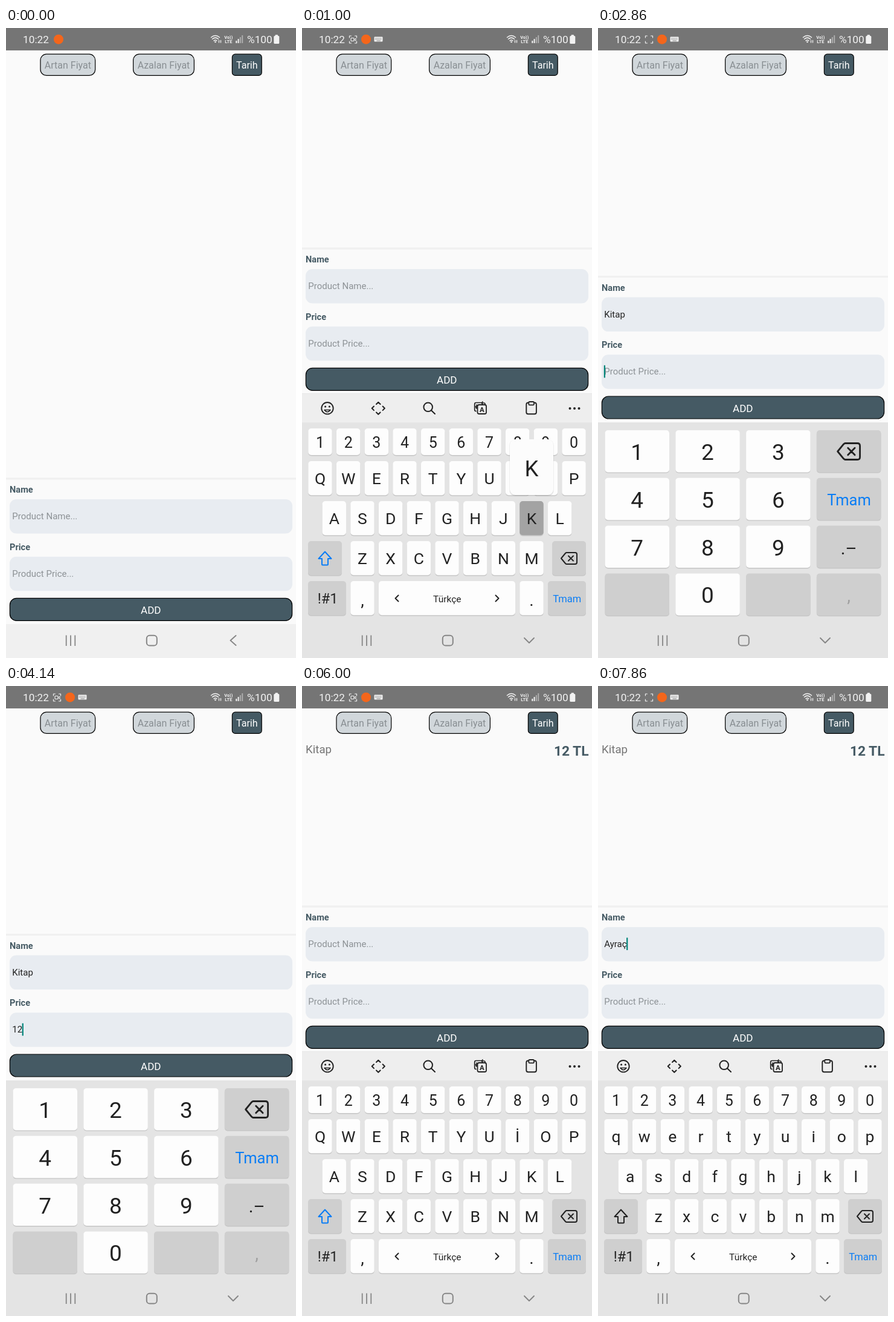
Write an HTML page that moves like this. It is 480 by 1040 pixels and loops after 8 s.

```html
<!DOCTYPE html>
<html lang="tr">
<head>
<meta charset="utf-8">
<title>Product list</title>
<style>
  html, body { margin: 0; width: 100%; height: 100%; overflow: hidden; background: #fafafa; }
  svg { display: block; width: 480px; height: 1040px; font-family: Roboto, sans-serif; }
</style>
</head>
<body>
<svg id="stage" viewBox="0 0 480 1040"></svg>
<script>
const LOOP = 8000, TICKS_PER_SECOND = 7;
const SLATE = '#455a64', INK = '#222', BLUE = '#0a7df5', KEY = '#fdfdfd', DARK_KEY = '#cfcfcf', HELD = '#a3a3a3';
const stage = document.getElementById('stage');

// Each step lists what changes at that tick.
const steps = [
  [0, { name: '', price: '', form: 0, pad: '', caps: true, slide: 0, focus: '', held: '', menu: false, icons: 0, item: false, addOpacity: 1 }],
  [1, { icons: 1 }],
  [2, { focus: 'name' }],
  [3, { pad: 'letters', form: -380, slide: 210 }],
  [4, { slide: 45 }],
  [5, { slide: 0, icons: 2 }],
  [6, { focus: '' }],
  [7, { held: 'k' }],
  [8, { name: 'K', held: '', caps: false, focus: 'name' }],
  [9, { held: 'i' }],
  [10, { held: '', name: 'Ki' }],
  [11, { held: 't' }],
  [12, { held: '', name: 'Kit' }],
  [13, { held: 'a' }],
  [14, { held: '', name: 'Kita' }],
  [15, { name: 'Kitap' }],
  [18, { focus: 'price' }],
  [19, { pad: 'digits', form: -333.4 }],
  [23, { held: '1' }],
  [24, { held: '', price: '1' }],
  [25, { held: '2' }],
  [26, { held: '', price: '12' }],
  [30, { addOpacity: 0.4 }],
  [31, { name: '', price: '', item: true, addOpacity: 0.7 }],
  [32, { addOpacity: 1 }],
  [36, { focus: '' }],
  [38, { focus: 'name' }],
  [39, { pad: 'letters', form: -380, caps: true }],
  [42, { focus: '' }],
  [43, { held: 'a' }],
  [45, { held: '', name: 'A', caps: false, focus: 'name' }],
  [46, { held: 'y' }],
  [47, { held: '', name: 'Ay' }],
  [48, { held: 'r' }],
  [49, { held: '', name: 'Ayr' }],
  [50, { held: 'a' }],
  [51, { held: '', name: 'Ayra' }],
  [52, { held: 'c' }],
  [53, { menu: true }],
  [55, { held: '', menu: false, name: 'Ayraç' }]
];

const stateAt = tick => Object.assign({}, ...steps.filter(s => s[0] <= tick).map(s => s[1]));

const rect = (x, y, w, h, r, fill, extra = '') =>
  `<rect x="${x}" y="${y}" width="${w}" height="${h}" rx="${r}" fill="${fill}" ${extra}/>`;
const text = (x, y, size, fill, str, anchor = 'start', weight = 400, extra = '') =>
  `<text x="${x}" y="${y}" font-size="${size}" fill="${fill}" text-anchor="${anchor}" font-weight="${weight}" ${extra}>${str}</text>`;
const mid = (x, y, size, fill, str, weight) => text(x, y, size, fill, str, 'middle', weight);
const line = (d, color = INK, width = 2, extra = '') =>
  `<path d="${d}" fill="none" stroke="${color}" stroke-width="${width}" stroke-linecap="round" stroke-linejoin="round" ${extra}/>`;
const circle = (x, y, r, fill, extra = '') => `<circle cx="${x}" cy="${y}" r="${r}" fill="${fill}" ${extra}/>`;
const outline = (color, width) => `stroke="${color}" stroke-width="${width}"`;

function statusBar(s, recording) {
  const white = '#f2f2f2';
  let out = rect(0, 0, 480, 37, 0, '#757575') + text(28, 25, 17.3, white, '10:22');
  out += circle(s.icons ? 106 : 87, 18.7, 8, '#f4661b');
  if (s.icons) {
    out += line('M81.500 13H78.500V16M87.500 13H90.500V16M78.500 22V25H81.500M90.500 22V25H87.500', white, 1.2);
    if (recording) out += rect(81, 16.5, 5, 5, 1, 'none', outline(white, 1.1)) + line('M86.500 19L89 17V21Z', white, 1);
  }
  if (s.icons > 1) {
    out += rect(119.5, 14.5, 14, 8, 1, white);
    out += line('M121.500 17H132M121.500 19H132', '#757575', 0.9, 'stroke-dasharray="0.6 1.6"') + line('M124 21H129.500', '#757575', 0.8);
  }
  out += line('M339.500 15.500Q346.500 9.500 353.500 15.500M341.500 18.300Q346.500 14 351.500 18.300M344 21Q346.500 19 349 21', white, 1.5);
  out += circle(346.5, 23, 1.3, white) + line('M352.500 24V20.500M355.500 20.500V24', white, 1.3);
  out += mid(368.3, 17.5, 7.4, white, 'Vo))', 700) + mid(368.3, 25, 7.4, white, 'LTE', 700);
  for (let i = 0; i < 4; i++) {
    const h = 4 + i * 3;
    out += rect(380.3 + i * 3.3, 25 - h, 2, h, 0.5, white, i > 1 ? 'opacity="0.45"' : '');
  }
  return out + text(399, 25, 17.3, white, '%100') + rect(443.3, 13, 9, 13, 1.5, white) + rect(445.5, 11.3, 4.6, 3, 0.8, white);
}

function sortButtons() {
  const black = outline('#000', 1.2);
  return rect(57, 43.2, 90.7, 35.2, 10, '#d1d7db', black) + mid(102.4, 67, 16, '#888e92', 'Artan Fiyat') +
    rect(210.6, 43.2, 100.8, 35.2, 10, '#d1d7db', black) + mid(261, 67, 16, '#888e92', 'Azalan Fiyat') +
    rect(374.4, 43.2, 48.8, 35.2, 5, SLATE, black) + mid(398.8, 67, 16, '#fff', 'Tarih');
}

function field(id, label, y, value, hint) {
  return text(6, y - 11, 14.6, SLATE, label, 'start', 700) + rect(6, y, 468, 56.5, 11, '#e8ecf1') +
    text(10.3, y + 33, 15, value ? INK : '#8d9296', value || hint, 'start', 400, `id="${id}"`);
}

function form(s) {
  return `<g transform="translate(0 ${s.form})">` + rect(0, 742.5, 480, 3, 0, '#f0f0f0') +
    field('name', 'Name', 778, s.name, 'Product Name...') +
    field('price', 'Price', 872.7, s.price, 'Product Price...') +
    `<g opacity="${s.addOpacity}">` + rect(6.4, 941.4, 467.2, 37, 11, SLATE, outline('#000', 1.2)) +
    mid(239.8, 967, 17.1, '#fff', 'ADD') + '</g></g>';
}

function caret(s) {
  if (!s.focus) return '';
  const width = s[s.focus] ? document.getElementById(s.focus).getComputedTextLength() : 0;
  const top = (s.focus === 'name' ? 795.5 : 890.2) + s.form;
  return rect(9.8 + width, top, 2.2, 20.5, 0, '#00857a');
}

const keycap = (x, y, w, h, fill) => rect(x, y + 1.4, w, h, 5, '#c6c6c6') + rect(x, y, w, h, 5, fill);

function backspace(x, y, k) {
  return `<g transform="translate(${x} ${y}) scale(${k})">` +
    line('M-13 0L-6 -8.500Q-5 -9.500 -4 -9.500H10Q13 -9.500 13 -6.500V6.500Q13 9.500 10 9.500H-4Q-5 9.500 -6 8.500ZM-1 -4L7 4M7 -4L-1 4') + '</g>';
}

function toolbar() {
  return rect(0, 603.7, 480, 47.5, 0, '#eee') +
    circle(42, 627.7, 9.7, 'none', outline(INK, 1.9)) + circle(38.6, 625, 1.5, INK) + circle(45.4, 625, 1.5, INK) +
    line('M37 630.500Q42 637 47 630.500Z', INK, 1.6) +
    line('M123 621L126.300 617.700L129.600 621M123 634.500L126.300 637.800L129.600 634.500M119 624.500L115.700 627.800L119 631.100M133.600 624.500L136.900 627.800L133.600 631.100') +
    circle(208.7, 625.8, 7.3, 'none', outline(INK, 2)) + line('M214 631.200L220 637') +
    rect(290.5, 622, 14.5, 15, 2.5, 'none', outline(INK, 1.8)) +
    line('M288 632.500Q285.700 632.500 285.700 630V621Q285.700 618.500 288 618.500H296M289 622V628M287.500 625L289 628M299 617L297 619L299 621M297 619H301Q303 619 303 621', INK, 1.7) +
    mid(297.8, 634, 11.5, INK, 'A', 700) +
    rect(371.3, 618.5, 16.6, 18.8, 3, 'none', outline(INK, 1.9)) + rect(375.3, 617, 8.6, 5.4, 1.5, '#eee', outline(INK, 1.8)) +
    [443.5, 451, 458.5].map(x => circle(x, 628, 2, INK)).join('');
}

function letterPad(s) {
  const rows = [['1234567890', 30, 661, 44], ['qwertyuiop', 30, 715, 56.3], ['asdfghjkl', 53.3, 781, 56.3], ['zxcvbnm', 100, 847, 56.3]];
  const cased = ch => s.caps ? ch.toLocaleUpperCase('tr') : ch;
  let out = rect(0, 603, 480, 437, 0, '#e4e4e4') + toolbar(), popup = '';
  for (const [chars, start, y, h] of rows) {
    [...chars].forEach((ch, i) => {
      const x = start + i * 46.67, held = ch === s.held;
      out += keycap(x - 19.7, y, 39.4, h, held ? HELD : KEY);
      out += mid(x, y + (h < 50 ? 32.2 : 38), h < 50 ? 25 : 26.5, INK, cased(ch));
      if (held) popup = bubble(x, y - 102, s.menu ? ['ç', 'ć'] : [cased(ch)]);
    });
  }
  const shiftColor = s.caps ? BLUE : INK;
  out += keycap(10, 847, 56, 56.3, DARK_KEY) + line('M38 864.500L48.500 876H43V885.500Q43 886.500 42 886.500H34Q33 886.500 33 885.500V876H27.500Z', shiftColor, 2);
  out += keycap(414, 847, 56, 56.3, DARK_KEY) + backspace(442, 875.5, 1);
  out += keycap(10, 913, 63, 56.3, DARK_KEY) + mid(42.5, 950, 23.5, INK, '!#1');
  out += keycap(80.3, 913, 39.4, 56.3, KEY) + mid(100, 954, 28, INK, ',');
  out += keycap(127, 913, 226, 56.3, KEY) + mid(240.3, 948, 15.5, INK, 'Türkçe');
  out += line('M159.500 936.500L154.500 941.500L159.500 946.500M320.500 936.500L325.500 941.500L320.500 946.500', INK, 1.9);
  out += keycap(360.3, 913, 39.4, 56.3, KEY) + mid(380, 954, 28, INK, '.');
  out += keycap(407, 913, 63, 56.3, DARK_KEY) + mid(438.7, 948, 16.5, BLUE, 'Tmam');
  return out + popup;
}

function bubble(x, y, chars) {
  const left = x - 36, width = 72 * chars.length;
  let out = rect(left - 1, y, width + 2, 94, 10, '#000', 'opacity="0.06"') + rect(left, y + 1, width, 92, 9, '#000', 'opacity="0.1"') +
    rect(left, y, width, 92, 9, '#fcfcfc');
  if (chars.length > 1) out += rect(left + 8, y + 14, 56, 64, 8, DARK_KEY);
  chars.forEach((ch, i) => { out += mid(x + i * 72, y + 61, 36.5, INK, ch); });
  return out;
}

function digitPad(s) {
  let out = rect(0, 651, 480, 389, 0, '#e4e4e4');
  const labels = ['1', '2', '3', 'del', '4', '5', '6', 'Tmam', '7', '8', '9', '.–', '', '0', '', ','];
  labels.forEach((label, i) => {
    const x = 11.5 + i % 4 * 116.8, y = 664 + Math.floor(i / 4) * 78.8, cx = x + 53.2;
    const digit = /^\d$/.test(label);
    out += keycap(x, y, 106.5, 69.4, label && label === s.held ? HELD : digit ? KEY : DARK_KEY);
    if (digit) out += mid(cx, y + 49, 37, INK, label);
    else if (label === 'del') out += backspace(cx, y + 35, 1.42);
    else if (label === 'Tmam') out += mid(cx + 0.5, y + 45, 25.5, BLUE, label);
    else out += mid(cx, y + 47, 29, label === ',' ? '#a0a0a0' : INK, label);
  });
  return out;
}

function navBar(open) {
  const gray = '#868686';
  return rect(0, 984, 480, 56, 0, open ? '#e4e4e4' : '#f0f0f0') +
    [99.7, 107, 114.3].map(x => rect(x - 0.9, 1002.5, 1.8, 17.5, 0, gray)).join('') +
    rect(232.8, 1002.8, 17, 16.8, 5, 'none', outline(gray, 2)) +
    line(open ? 'M368 1007L376 1015L384 1007' : 'M380.500 1003L371.500 1011L380.500 1019', gray, 1.9);
}

function draw(tick) {
  const s = stateAt(tick);
  const recording = tick % TICKS_PER_SECOND < 4;
  const pad = s.pad === 'letters' ? letterPad(s) : s.pad ? digitPad(s) : '';
  const item = s.item ? text(6, 110.8, 18.7, '#757575', 'Kitap') + text(474.5, 115, 22.8, SLATE, '12 TL', 'end', 700) : '';
  stage.innerHTML = rect(0, 0, 480, 1040, 0, '#fafafa') + statusBar(s, recording) + sortButtons() + item + form(s) +
    '<g id="caret"></g>' + `<g transform="translate(0 ${s.slide})">${pad}</g>` + navBar(!!s.pad);
  document.getElementById('caret').innerHTML = caret(s);
}

let shown = -1;
const origin = performance.now();
function frame() {
  const time = (performance.now() - origin) % LOOP;
  const tick = Math.min(55, Math.floor((time + 5) * TICKS_PER_SECOND / 1000));
  if (tick !== shown) draw(shown = tick);
  requestAnimationFrame(frame);
}
frame();
</script>
</body>
</html>
```
